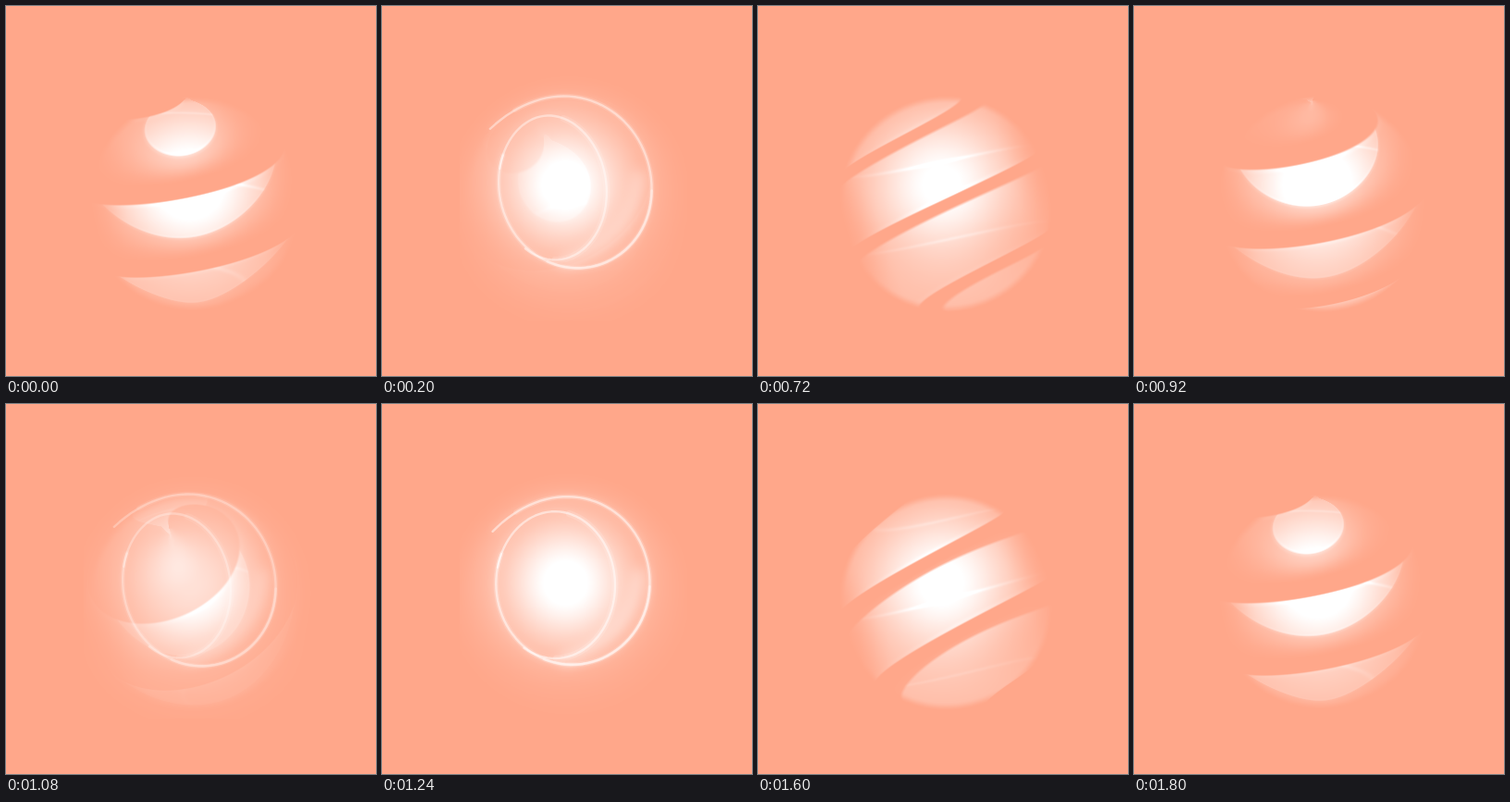
An HTML page with a canvas that plays this animation: 400x400 px, repeating every 1840 ms.

```html
<!DOCTYPE html>
<html lang="en">
<head>
<meta charset="utf-8">
<title>Glowing helix</title>
<style>
  html, body { margin: 0; width: 100%; height: 100%; overflow: hidden; background: #ffa78a; }
  canvas { display: block; width: 400px; height: 400px; }
</style>
</head>
<body>
<canvas id="stage" width="400" height="400"></canvas>
<script>
const ctx = document.getElementById('stage').getContext('2d');
const LOOP = 1840, STEP = 40, HALF = 900, TAU = Math.PI * 2;
const R = 118, CX = 203, CY = 213.5;    // helix body
const GX = 198, GY = 193;               // inner light
const PITCH = 84, GAP = 43.5;
const box = { x: 84, y: 72, w: 246, h: 268 };
const img = ctx.createImageData(box.w, box.h);

const clamp = (v, a = 0, b = 1) => Math.min(b, Math.max(a, v));
const mix = (a, b, k) => a + (b - a) * k;
const smooth = (a, b, v) => { const k = clamp((v - a) / (b - a)); return k * k * (3 - 2 * k); };
const frac = v => v - Math.floor(v);
const bump = (v, c, w) => Math.exp(-(((v - c) / w) ** 2));

// The body turns over once in two halves; the axis leans as it tips.
function poseAt(t) {
  const turn = Math.floor(t / HALF), x = t / HALF - turn;
  const lean = Math.sin(Math.PI * x) ** 2;
  const deg = 15 + 180 * x - 14 * Math.sin(TAU * x) + 20 * lean;
  return {
    deg,
    tip: (deg + 180 * turn) * Math.PI / 180,
    roll: (-5 - 40 * lean) * Math.PI / 180
  };
}

function paintGlow(pose) {
  const ce = Math.cos(pose.tip), se = Math.sin(pose.tip);
  const cr = Math.cos(pose.roll), sr = Math.sin(pose.roll);
  const side = se >= 0 ? 1 : -1, open = Math.abs(se);
  const whole = smooth(0.55, 0.83, open);
  const tilt = clamp(open / 0.26);
  const spread = mix(mix(78, 84, tilt), 67, whole);
  const gain = mix(mix(1.06, 1.22, tilt), 1.13, whole);

  // Position within one turn of the ribbon, 0 being the middle of the gap.
  const place = (up, w, z) => {
    const h = up * ce + z * se;
    const phi = Math.atan2(w, z * ce - up * se);
    return { h, v: frac(side * ((GAP - h) / PITCH + phi / TAU)) };
  };

  const data = img.data;
  let i = 0;
  for (let y = 0; y < box.h; y++) {
    for (let x = 0; x < box.w; x++, i += 4) {
      const px = box.x + x, py = box.y + y;
      const dx = px - CX, dy = py - CY;
      const floor = 0.2 * smooth(20, 105, dy) * (1 - whole);
      const g = floor + gain * Math.exp(-((px - GX) ** 2 + (py - GY) ** 2) / spread ** 2);
      const rr = (dx * dx + dy * dy) / (R * R);
      const w = dx * cr + dy * sr, up = dx * sr - dy * cr;
      const limb = smooth(0, 0.65, 1 - (w / R) ** 2) * smooth(0, 0.16, 1 - rr);
      let band = 0;
      if (rr < 1 && whole < 1) {
        const z = R * Math.sqrt(1 - rr);
        const { h, v } = place(up, w, z);
        const back = place(up, w, -z).v;
        const sp = clamp(w / Math.sqrt(Math.max(R * R - h * h, 80)), -1, 1);
        const end = mix(0.93, 0.58 - 0.7 * sp * sp, tilt);
        const rise = smooth(0.05, 0.078, v);
        const bright = 1 - smooth(end - 0.025, end + 0.025, v);
        const tail = 0.42 * tilt * (1 - smooth(end, mix(0.95, 0.88, tilt), v));
        band = rise * Math.max(bright, tail)
          + 0.1 * bump(v, 0.085, 0.025)
          + 0.14 * tilt * rise * bump(v, end, 0.025);
        band += 0.22 * rise * bright * bump(back, 0.08, 0.022);
      }
      const rim = mix(limb, 1 - smooth(0.8, 1.6, rr), whole);
      const a = clamp(g * mix(band, 1, whole) * rim);
      data[i] = data[i + 1] = data[i + 2] = 255;
      data[i + 3] = a * 255;
    }
  }
  ctx.clearRect(0, 0, 400, 400);
  ctx.putImageData(img, box.x, box.y);
  return whole;
}

// Seen along its axis the ribbon's edge is a two-turn spiral that closes to one ring.
function spiralPoint(turns, b) {
  const k = smooth(0.45, 1.3, turns);
  const a = -2.6 + turns * TAU;
  const flare = 20 * Math.exp(-turns * 9);
  const ca = Math.cos(a), sa = Math.sin(a);
  const x0 = mix(207, 187, k) + (mix(82, 65, k) + flare) * ca;
  const y0 = mix(194, 196, k) + (mix(89, 79, k) + flare) * sa;
  const c = Math.SQRT1_2;
  const u = 91 * Math.cos(a + Math.PI / 4), v = 78 * Math.sin(a + Math.PI / 4);
  const x1 = 198 + (u + v) * c, y1 = 192.5 + (v - u) * c;
  return [mix(x0, x1, b), mix(y0, y1, b)];
}

function stroke(from, to, b, width, alpha, blur) {
  ctx.beginPath();
  const n = Math.ceil((to - from) * 90);
  for (let i = 0; i <= n; i++) ctx.lineTo(...spiralPoint(mix(from, to, i / n), b));
  ctx.lineWidth = width;
  ctx.strokeStyle = `rgba(255,255,255,${alpha})`;
  ctx.shadowColor = `rgba(255,255,255,${alpha})`;
  ctx.shadowBlur = blur;
  ctx.stroke();
}

function paintRings(deg, whole) {
  if (whole < 0.02) return;
  const b = clamp((deg - 90.5) / 31.5, -0.3, 1.25);
  const k = clamp(b), closed = smooth(0.5, 1, b);
  ctx.save();
  ctx.lineCap = 'round';
  ctx.lineJoin = 'round';
  stroke(0, 0.98, b, 2.4, 0.5 * whole, 9);
  stroke(0.05, 0.98, b, 5.5, 0.15 * whole, 8);
  stroke(0.95, 1.75, b, 2.4, mix(0.5, 0.12, closed) * whole, 8);
  stroke(0.42, 0.72, b, 3.2, 0.32 * whole, 8);
  if (k < 0.9) {
    stroke(1.2, 1.66, b, 7, 0.14 * whole * (1 - k), 14);
    // Soft light caught between the two turns.
    ctx.filter = 'blur(7px)';
    ctx.beginPath();
    ctx.moveTo(278, 185);
    ctx.quadraticCurveTo(272, 250, 198, 276);
    ctx.lineWidth = 14;
    ctx.strokeStyle = `rgba(255,255,255,${0.4 * whole * (1 - k)})`;
    ctx.shadowBlur = 0;
    ctx.stroke();
  }
  ctx.restore();
}

let shown = -1;
function tick() {
  const t = Math.floor((performance.now() % LOOP) / STEP) * STEP;
  if (t !== shown) {
    shown = t;
    const pose = poseAt(t);
    paintRings(pose.deg, paintGlow(pose));
  }
  requestAnimationFrame(tick);
}
tick();
</script>
</body>
</html>
```
